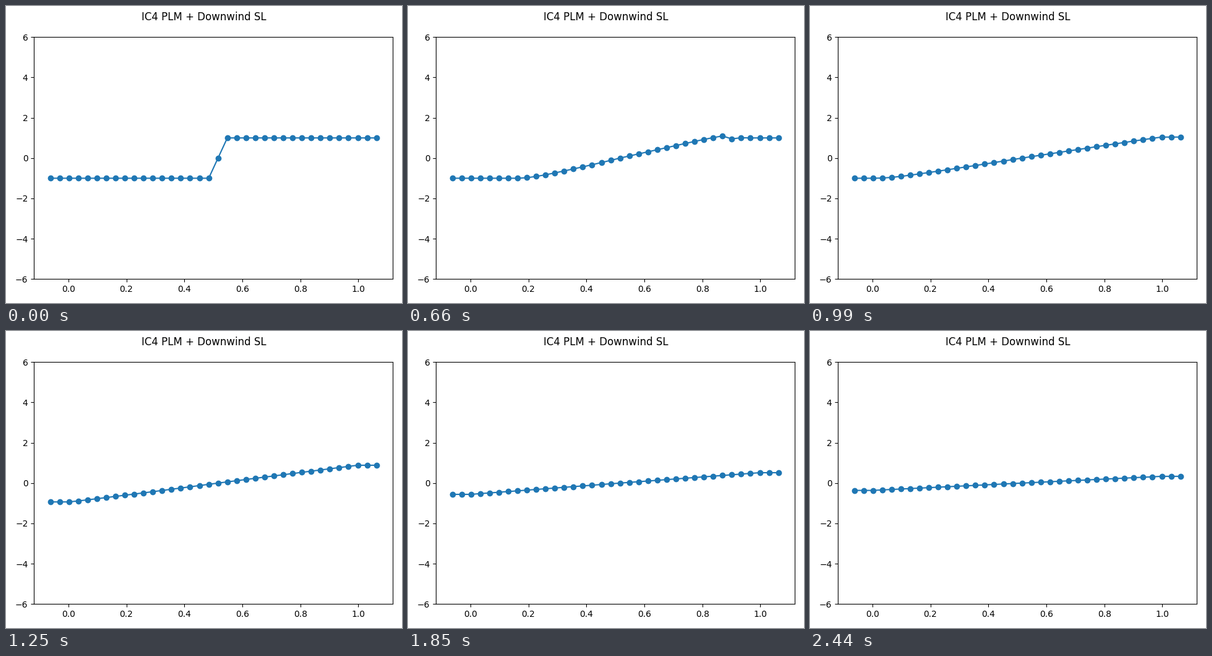
A matplotlib script for the animation above (2510 ms loop, 640x480 px).

```python
import numpy as np
import matplotlib.pyplot as plt
from matplotlib.animation import FuncAnimation

CELLS, GHOSTS = 32, 2
FRAMES, LOOP_MS = 38, 2510
CFL = 0.9

dx = 1 / CELLS
x = np.linspace(-GHOSTS * dx, 1 + GHOSTS * dx, CELLS + 2 * GHOSTS)
gap = x[1] - x[0]


def fill_ghosts(u):
    u[:GHOSTS] = u[GHOSTS]
    u[-GHOSTS:] = u[-GHOSTS - 1]


def riemann(left, right):
    """Burgers state on each face."""
    shock = np.where(left + right > 0, left, right)
    shock = np.where(left + right == 0, 0, shock)
    fan = np.where(left >= 0, left, np.where(right <= 0, right, 0))
    return np.where(left > right, shock, fan)


def advance(u):
    """One piecewise linear step with one-sided, unlimited slopes."""
    dt = CFL * dx / abs(u.min())
    slope = np.diff(u, prepend=u[0])
    left = u + 0.5 * (1 - u * dt / gap) * slope
    right = u - 0.5 * (1 + u * dt / gap) * slope
    flux = 0.5 * riemann(left[:-1], right[1:]) ** 2
    new = u.copy()
    new[1:-1] -= dt / dx * np.diff(flux)
    fill_ghosts(new)
    return new


# A jump from -1 to 1 through a single zero cell
states = [np.sign(np.arange(x.size) - (GHOSTS + CELLS // 2)).astype(float)]
while len(states) < FRAMES:
    states.append(advance(states[-1]))

plt.rcParams["font.family"] = "DejaVu Sans"
fig, ax = plt.subplots(figsize=(6.4, 4.8), dpi=100)
line, = ax.plot(x, states[0], "o-", color="#1f77b4")
ax.set_ylim(-6, 6)
fig.suptitle("IC4 PLM + Downwind SL", y=0.982)
fig.tight_layout()
fig.subplots_adjust(top=1 - 50.3 / 480)


def draw(frame):
    line.set_ydata(states[frame])
    return line,


anim = FuncAnimation(fig, draw, frames=FRAMES, interval=LOOP_MS / FRAMES,
                     repeat=True, repeat_delay=0)
plt.show()
```
